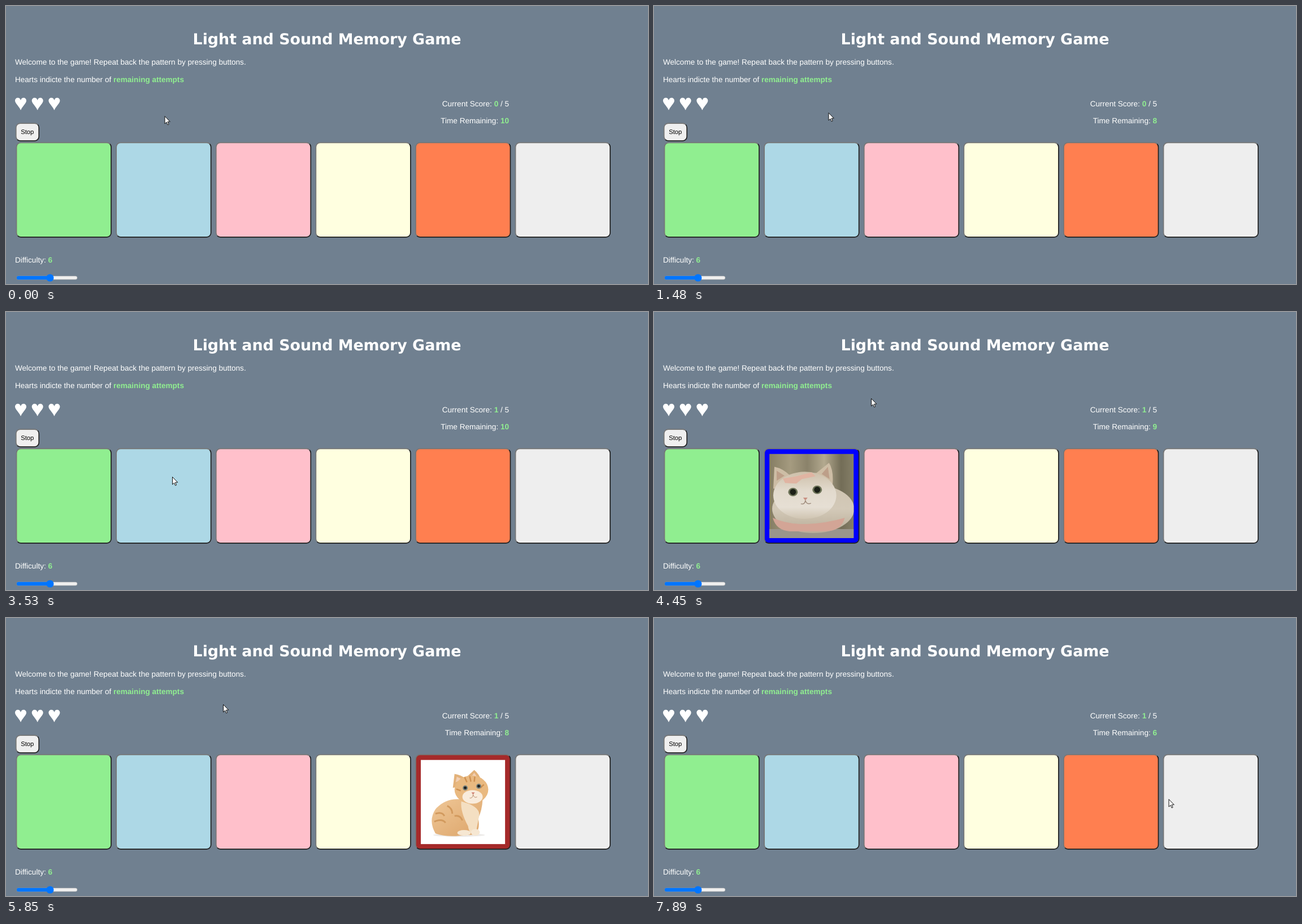
These frames come from a looping animation (1136x493 px, 8000 ms). An HTML page:

```html
<!DOCTYPE html>
<html lang="en">
<head>
<meta charset="utf-8">
<title>Memory Game</title>
<style>
  html, body { margin: 0; width: 100%; height: 100%; overflow: hidden; background: #708090; }
  svg { display: block; }
  text { font: 13.55px "Liberation Sans", Arial, sans-serif; fill: #fff; text-rendering: geometricPrecision; }
  .title { font: bold 26.85px "DejaVu Sans", Verdana, sans-serif; text-anchor: middle; }
  .right { text-anchor: end; }
  .mark { font-weight: bold; fill: #90ee90; }
  .label { font-size: 11.27px; fill: #000; text-anchor: middle; }
</style>
</head>
<body>
<svg id="stage" width="1136" height="493" viewBox="0 0 1136 493">
  <defs>
    <path id="heart" d="M10 22Q8.400 18 4 12.600Q0 8 0 5.200C0 2 2.300 0 5 0Q8.600 0 10 4.400Q11.400 0 15 0C17.700 0 20 2 20 5.200Q20 8 16 12.600Q11.600 18 10 22Z" fill="#fff"/>
    <linearGradient id="room">
      <stop offset="0" stop-color="#857d63"/><stop offset=".25" stop-color="#a59b80"/>
      <stop offset=".45" stop-color="#8a826a"/><stop offset=".65" stop-color="#b3a98f"/>
      <stop offset=".85" stop-color="#736d57"/><stop offset="1" stop-color="#857f68"/>
    </linearGradient>
    <linearGradient id="fluff" x2="0" y2="1">
      <stop offset="0" stop-color="#cfc4b1"/><stop offset=".5" stop-color="#d3c9b8"/>
      <stop offset="1" stop-color="#b9ad98"/>
    </linearGradient>
    <linearGradient id="face" x2="0" y2="1">
      <stop offset="0" stop-color="#cdbfa9"/><stop offset=".4" stop-color="#e2dacd"/>
      <stop offset=".75" stop-color="#e6dfd4"/><stop offset="1" stop-color="#cfc4b1"/>
    </linearGradient>
    <linearGradient id="ginger" x2="1" y2="1">
      <stop offset="0" stop-color="#efc797"/><stop offset="1" stop-color="#dca469"/>
    </linearGradient>
    <symbol id="whiteCat" viewBox="0 0 150 150">
      <rect width="150" height="150" fill="url(#room)"/>
      <rect y="134" width="150" height="16" fill="#9a958c"/>
      <ellipse cx="78" cy="98" rx="73" ry="43" fill="url(#fluff)"/>
      <path d="M7 62L9 23Q24 26 36 38L84 34L106 16Q115 30 112 58Z" fill="#cdbda5"/>
      <path d="M13 48L13 30L27 39ZM93 36L104 23L107 45Z" fill="#bd9f89"/>
      <ellipse cx="63" cy="74" rx="56" ry="42" fill="url(#face)"/>
      <path d="M6 114Q32 126 66 125T134 114Q128 138 98 138H36Q12 136 6 114Z" fill="#d3a596"/>
      <path d="M24 44L48 40L75 33L82 40L58 45L48 53L28 52Z" fill="#e0b4a2"/>
      <g fill="#6d7358"><ellipse cx="42" cy="68" rx="8.500" ry="7.500"/><ellipse cx="85" cy="64" rx="8.500" ry="7.500"/></g>
      <g fill="#1c2017"><circle cx="42" cy="68" r="5.500"/><circle cx="85" cy="64" r="5.500"/></g>
      <path d="M60 78H68L64 83Z" fill="#c88e80"/>
      <path d="M56 89Q63 91 64 83Q66 91 74 88" fill="none" stroke="#a08d7d" stroke-width="1.500"/>
    </symbol>
    <symbol id="gingerCat" viewBox="0 0 150 150">
      <rect width="150" height="150" fill="#fff"/>
      <ellipse cx="68" cy="134" rx="46" ry="3" fill="#eceae8"/>
      <path d="M26 131Q13 108 26 88Q42 70 64 70H110Q109 90 102 104Q106 122 97 133L70 135Q44 138 26 131Z" fill="url(#ginger)"/>
      <path d="M72 74Q104 82 104 98L98 130Q86 134 84 118Q70 92 72 74Z" fill="#f4dfc2"/>
      <path d="M26 96Q38 92 42 100M24 110Q38 104 44 112M47 82Q56 86 56 96M60 100Q70 98 74 108" fill="none" stroke="#d29a5e" stroke-width="3"/>
      <ellipse cx="77" cy="130" rx="12" ry="5" fill="#f6e7d2"/><ellipse cx="97" cy="129" rx="8" ry="6" fill="#f6e7d2"/>
      <path d="M57 50L60 25Q72 27 79 33L95 18Q104 25 108 38Z" fill="#e3b27a"/>
      <path d="M62 40L64 30L74 35ZM89 31L95 23L101 32Z" fill="#f2cfb4"/>
      <ellipse cx="90" cy="53" rx="30" ry="25" fill="#e9b980"/>
      <path d="M78 31L82 40M87 29L89 39M96 30L95 39M63 52L71 55M112 44L106 50" stroke="#cf9152" stroke-width="2.500"/>
      <ellipse cx="92" cy="66" rx="18" ry="12" fill="#f9ecdc"/>
      <g fill="#78817c"><circle cx="79" cy="50" r="4.500"/><circle cx="103" cy="47" r="4.500"/></g>
      <g fill="#1d1d1b"><circle cx="79" cy="50" r="2.500"/><circle cx="103" cy="47" r="2.500"/></g>
      <path d="M90 58H96L93 62Z" fill="#cf8070"/>
      <path d="M87 68Q92 69 93 62Q95 69 100 66" fill="none" stroke="#b78a6a"/>
    </symbol>
  </defs>

  <rect width="1136" height="493" fill="#708090"/>
  <text class="title" x="568" y="67.800">Light and Sound Memory Game</text>
  <text x="16" y="104">Welcome to the game! Repeat back the pattern by pressing buttons.</text>
  <text x="16" y="134.500">Hearts indicte the number of <tspan class="mark">remaining attempts</tspan></text>
  <use href="#heart" x="16" y="162.800"/>
  <use href="#heart" x="45.700" y="162.800"/>
  <use href="#heart" x="75.400" y="162.800"/>
  <text class="right" x="890" y="177.700">Current Score: <tspan class="mark" id="score">0</tspan> / 5</text>
  <text class="right" x="890" y="207.600">Time Remaining: <tspan class="mark" id="timer">10</tspan></text>

  <g id="buttons"></g>
  <text class="label" x="37.800" y="227.200">Stop</text>

  <text x="16" y="454.800">Difficulty: <tspan class="mark">6</tspan></text>
  <rect x="19" y="479" width="107" height="6" rx="3" fill="#efefef" stroke="#b2b2b2" stroke-width=".6"/>
  <rect x="18.800" y="478.700" width="60" height="6.600" rx="3.300" fill="#0075ff"/>
  <circle cx="77.900" cy="482" r="6.600" fill="#0075ff"/>

  <path id="cursor" d="M.6 .6V16.400L4.200 13L6.600 18.600L9 17.600L6.600 12H11.600Z" fill="#fff" stroke="#000" stroke-width="1.100"/>
</svg>
<script>
const LOOP = 8000;
const BORDER = 1.69, RADIUS = 8.45, TILE = 169.2, PITCH = 176.6;
const LIGHT = '#767676', DARK = '#1f1f1f';
const $ = id => document.getElementById(id);

function add(parent, tag, attrs) {
  const node = document.createElementNS('http://www.w3.org/2000/svg', tag);
  for (const key in attrs) node.setAttribute(key, attrs[key]);
  return parent.appendChild(node);
}

// Rounded button with a two-tone bevel; the second edge is the first one turned by 180 degrees.
function makeButton(x, y, w, h, color, litColor, photo) {
  const group = add($('buttons'), 'g', { transform: `translate(${x} ${y})` });
  const face = add(group, 'rect', { x: 1, y: 1, width: w - 2, height: h - 2, rx: RADIUS - 1, fill: color });
  const image = photo && add(group, 'use', { href: '#' + photo, x: 9.8, y: 10, width: 149.4, height: 149.4 });
  const edge = BORDER / 2, r = RADIUS - edge;
  const mid = edge + r * (1 - Math.SQRT1_2);
  const arc = `A${r} ${r} 0 0 1 `;
  const d = `M${mid} ${h - mid}${arc}${edge} ${h - RADIUS}V${RADIUS}${arc}${RADIUS} ${edge}` +
            `H${w - RADIUS}${arc}${w - mid} ${mid}`;
  const bevel = { d, fill: 'none', 'stroke-width': BORDER };
  const upper = add(group, 'path', bevel);
  const lower = add(group, 'path', { ...bevel, transform: `rotate(180 ${w / 2} ${h / 2})` });
  return (lit, pressed) => {
    face.setAttribute('fill', lit ? litColor : color);
    if (image) image.setAttribute('visibility', lit ? 'visible' : 'hidden');
    upper.setAttribute('stroke', pressed ? DARK : LIGHT);
    lower.setAttribute('stroke', pressed ? LIGHT : DARK);
  };
}

makeButton(16.9, 207.2, 42.2, 32.7, '#efefef')(false, false);
const tiles = [
  ['#90ee90'], ['#add8e6', '#0000ff', 'whiteCat'], ['#ffc0cb'],
  ['#ffffe0'], ['#ff7f50', '#a52a2a', 'gingerCat'], ['#eeeeee']
].map((look, i) => makeButton(17.7 + PITCH * i, 241.5, TILE, TILE, ...look));

const flashes = [
  { tile: 1, on: 730, off: 1480 },
  { tile: 1, on: 3380, off: 3530, pressed: true },
  { tile: 1, on: 4450, off: 5370 },
  { tile: 4, on: 5850, off: 6590 },
  { tile: 1, on: 7160, off: 7310, pressed: true }
];
const countdown = [[0, 10], [730, 9], [1480, 8], [2480, 7], [3530, 10], [4450, 9], [5520, 8], [6460, 7], [7470, 6]];
const pointer = [
  [0, 280.5, 195], [140, 308.5, 189],
  [1910, 308, 206], [2040, 304, 240], [2190, 299, 261], [2330, 296, 278], [2480, 295, 288], [2630, 294, 292],
  [4310, 376, 167], [4450, 384, 153],
  [6460, 372, 186], [6590, 320, 268], [6720, 306, 297],
  [7760, 640, 278], [7890, 910.5, 321]
];
const latest = (steps, t) => steps.findLast(step => step[0] <= t);

function draw(t) {
  tiles.forEach((paint, i) => {
    const flash = flashes.find(f => f.tile === i && t >= f.on && t < f.off);
    paint(!!flash, !!flash && !!flash.pressed);
  });
  $('score').textContent = t < 3530 ? 0 : 1;
  $('timer').textContent = latest(countdown, t)[1];
  const [, x, y] = latest(pointer, t);
  $('cursor').setAttribute('transform', `translate(${x} ${y}) scale(.845)`);
}

const start = performance.now();
function tick() {
  draw((performance.now() - start) % LOOP);
  requestAnimationFrame(tick);
}
tick();
</script>
</body>
</html>
```
